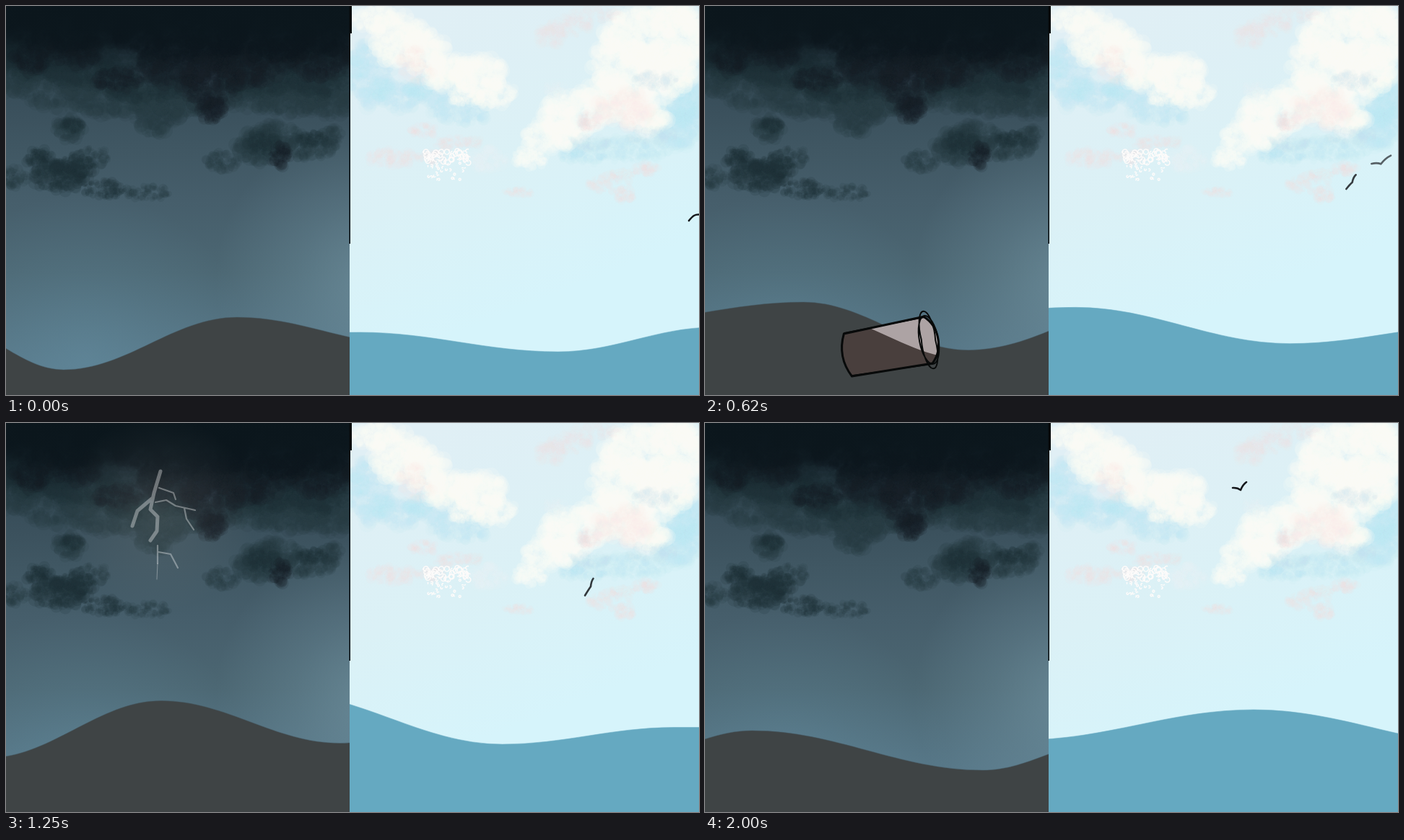
An HTML page with a canvas that plays this animation: 960 px wide and 540 px high, repeating every 2.12 s.

```html
<!DOCTYPE html>
<html lang="en">
<head>
<meta charset="utf-8">
<title>Storm and calm</title>
<style>
html, body { margin: 0; height: 100%; overflow: hidden; background: #0b161c; }
canvas { display: block; width: 100vw; height: 100vh; }
</style>
</head>
<body>
<canvas id="stage" width="960" height="540"></canvas>
<script>
const W = 960, H = 540, SPLIT = 476, LOOP = 2120;
const stage = document.getElementById('stage').getContext('2d');
const starts = Array.from({ length: 17 }, (_, k) => Math.floor(k * 12.5) * 10);

let seed = 7;
const random = () => (seed = (seed * 16807) % 2147483647) / 2147483647;

// Value of a track [[step, ...values], ...] at a step, or null outside its range
function at(track, step) {
  for (let i = 0; i < track.length; i++) {
    if (track[i][0] === step) return track[i].slice(1);
    const next = track[i + 1];
    if (next && track[i][0] < step && step < next[0]) {
      const u = (step - track[i][0]) / (next[0] - track[i][0]);
      return track[i].slice(1).map((v, j) => v + (next[j + 1] - v) * u);
    }
  }
  return null;
}

// ---------- painted sky ----------

function linear(c, x0, y0, x1, y1, stops) {
  const g = c.createLinearGradient(x0, y0, x1, y1);
  for (const [p, color] of stops) g.addColorStop(p, color);
  return g;
}

function glow(c, x, y, r, rgb, alpha) {
  const g = c.createRadialGradient(x, y, 0, x, y, r);
  g.addColorStop(0, `rgba(${rgb},${alpha})`);
  g.addColorStop(0.5, `rgba(${rgb},${alpha * 0.45})`);
  g.addColorStop(1, `rgba(${rgb},0)`);
  c.fillStyle = g;
  c.fillRect(x - r, y - r, 2 * r, 2 * r);
}

// Ragged brush cloud made of many small translucent dabs
function puff(c, color, alpha, [x, y, rx, ry]) {
  c.fillStyle = color;
  c.globalAlpha = alpha;
  for (let n = 40 + rx * ry / 8; n > 0; n--) {
    const a = random() * 2 * Math.PI, d = Math.sqrt(random());
    c.beginPath();
    c.arc(x + Math.cos(a) * d * rx, y + Math.sin(a) * d * ry, 1.5 + random() * Math.min(ry * 0.45, 11), 0, 7);
    c.fill();
  }
  c.globalAlpha = 1;
}
const puffs = (c, color, alpha, list) => list.forEach(p => puff(c, color, alpha, p));

function paintStorm(c) {
  c.fillStyle = linear(c, 0, 0, 0, 500, [[0, '#1b2a33'], [0.22, '#374c58'], [0.4, '#40576 3'.replace(' ', '')],
    [0.54, '#465e6b'], [0.74, '#4c6773'], [1, '#58798a']]);
  c.fillRect(0, 0, SPLIT, H);
  glow(c, 110, 490, 230, '104,148,168', 0.4);
  glow(c, 510, 380, 220, '120,155,170', 0.6);
  puffs(c, '#2a3c46', 0.15, [
    [10, 95, 35, 25], [70, 110, 55, 32], [140, 125, 55, 28], [205, 150, 30, 30], [245, 130, 45, 25],
    [335, 120, 50, 24], [395, 125, 50, 24], [445, 125, 36, 30], [88, 170, 20, 18],
    [300, 215, 23, 13], [350, 195, 33, 23], [375, 180, 35, 18], [420, 195, 36, 18], [452, 181, 15, 14],
    [12, 238, 22, 13], [115, 210, 27, 14], [195, 259, 34, 10]]);
  puffs(c, '#202f38', 0.16, [
    [48, 213, 20, 15], [75, 238, 38, 20], [95, 225, 30, 18], [135, 254, 30, 12], [92, 165, 14, 10],
    [355, 190, 22, 15], [425, 185, 20, 10], [25, 70, 38, 28], [100, 75, 60, 34],
    [190, 100, 65, 32], [350, 90, 60, 34], [430, 85, 50, 38]]);
  puffs(c, '#15222a', 0.13, [
    [35, 75, 26, 18], [95, 58, 42, 24], [155, 102, 32, 16], [285, 105, 42, 38], [285, 145, 18, 16],
    [240, 75, 60, 34], [340, 75, 50, 34], [430, 65, 50, 34], [380, 206, 15, 17]]);
  puffs(c, '#0c171d', 0.13, [[90, 30, 95, 28], [240, 40, 90, 32], [380, 38, 100, 36]]);
  c.fillStyle = linear(c, 0, 0, 0, 95, [[0, '#0b161c'], [0.35, 'rgba(11,22,28,.9)'], [1, 'rgba(11,22,28,0)']]);
  c.fillRect(0, 0, SPLIT, 95);
}

function paintCalm(c) {
  c.fillStyle = linear(c, 600, 0, 760, 400, [[0, '#e0eff5'], [0.55, '#dbf1f6'], [1, '#d6f4fb']]);
  c.fillRect(SPLIT, 0, W - SPLIT, H);
  puffs(c, '#bce4ef', 0.09, [
    [505, 95, 32, 45], [545, 125, 32, 20], [630, 145, 42, 18], [590, 115, 35, 20],
    [850, 200, 75, 16], [800, 208, 32, 12], [930, 165, 34, 30], [945, 130, 22, 24]]);
  puffs(c, '#fcfdfb', 0.16, [
    [510, 18, 32, 18], [545, 45, 38, 36], [580, 65, 32, 30], [615, 92, 38, 22], [655, 95, 36, 26],
    [675, 122, 32, 18], [640, 125, 26, 12], [900, 45, 75, 45], [855, 85, 45, 42], [915, 90, 38, 38],
    [925, 20, 32, 24], [845, 130, 55, 30], [785, 150, 42, 32], [755, 180, 38, 22], [725, 212, 24, 14],
    [885, 150, 35, 24]]);
  puffs(c, '#e9f5f7', 0.1, [[670, 213, 26, 16], [760, 115, 16, 10]]);
  puffs(c, '#cbe9f1', 0.07, [[900, 103, 30, 12], [895, 180, 35, 12], [810, 190, 28, 10]]);
  puffs(c, '#f8dde1', 0.1, [
    [535, 210, 34, 13], [578, 173, 20, 9], [618, 190, 30, 9], [590, 210, 20, 9],
    [710, 259, 21, 6], [835, 246, 30, 12], [858, 262, 14, 10], [887, 226, 18, 10], [808, 159, 14, 12]]);
  puffs(c, '#f9e6e7', 0.05, [[855, 142, 38, 26], [570, 92, 24, 14], [560, 70, 20, 14]]);
  puffs(c, '#f6e8e1', 0.08, [[755, 42, 22, 14], [780, 28, 32, 14], [815, 12, 38, 10], [648, 188, 16, 7], [855, 233, 18, 7]]);
  c.strokeStyle = '#fdfbfa';
  c.lineWidth = 1.5;
  for (let i = 0; i < 75; i++) {
    const low = i > 48, x = 610 + (random() - 0.5) * (low ? 55 : 62);
    const y = low ? 218 + random() * 24 : 201 + random() * 17;
    c.beginPath();
    c.arc(x, y, low ? 1.4 : 3.5, random() * 6, 4 + random() * 5);
    c.stroke();
  }
}

function makeSky() {
  const canvas = document.createElement('canvas');
  canvas.width = W;
  canvas.height = H;
  const c = canvas.getContext('2d');
  for (const [x, width, paint] of [[0, SPLIT, paintStorm], [SPLIT, W - SPLIT, paintCalm]]) {
    c.save();
    c.beginPath();
    c.rect(x, 0, width, H);
    c.clip();
    paint(c);
    c.restore();
  }
  return canvas;
}

// ---------- sea: each track is one crest or trough [step, x, y] ----------

const darkSea = [
  [[0, 320, 432], [1, 410, 437], [3, 480, 408], [6, 720, 400]],
  [[0, 80, 505], [1, 133, 508], [3, 215, 503], [6, 440, 465], [8, 700, 450]],
  [[0, -90, 440], [1, -40, 450], [3, -10, 447], [6, 210, 393], [8, 520, 402], [12, 800, 400]],
  [[3, -300, 440], [6, -60, 440], [8, 325, 449], [12, 600, 440], [16, 830, 440]],
  [[6, -300, 400], [8, 5, 378], [12, 425, 393], [16, 560, 440]],
  [[8, -235, 465], [12, 185, 465], [16, 385, 482]],
  [[8, -500, 370], [12, -110, 370], [16, 65, 427]],
  [[12, -400, 470], [16, -120, 470]],
  [[0, 560, 470], [1, 700, 460]]
];
const brightSea = [
  [[0, 980, 446], [1, 1040, 455]],
  [[0, 765, 480], [1, 890, 481], [3, 1160, 475]],
  [[0, 490, 453], [1, 590, 447], [3, 940, 448], [6, 1140, 440]],
  [[0, 300, 460], [1, 400, 458], [3, 670, 478], [6, 880, 464], [8, 1060, 460]],
  [[1, 200, 445], [3, 400, 445], [6, 570, 405], [8, 790, 405], [12, 1060, 440]],
  [[3, 100, 440], [6, 350, 435], [8, 470, 433], [12, 905, 459], [16, 1100, 450]],
  [[6, 100, 390], [8, 250, 380], [12, 505, 368], [16, 760, 398]],
  [[8, 0, 440], [12, 250, 440], [16, 440, 440]]
];

function seaPath(tracks, step) {
  const points = tracks.map(t => at(t, step)).filter(Boolean).sort((a, b) => a[0] - b[0]);
  const path = new Path2D();
  const [first, last] = [points[0], points[points.length - 1]];
  path.moveTo(-600, H);
  path.lineTo(-600, first[1]);
  path.lineTo(...first);
  for (let i = 1; i < points.length; i++) {
    const [px, py] = points[i - 1], [qx, qy] = points[i], d = (qx - px) * 0.364;
    path.bezierCurveTo(px + d, py, qx - d, qy, qx, qy);
  }
  path.lineTo(1600, last[1]);
  path.lineTo(1600, H);
  path.closePath();
  return path;
}

// ---------- floating things ----------

const bottle = {
  track: [[1, 77, 371, 23], [3, 279, 376, -9], [5, 490, 370, -30]],
  body: new Path2D('M-13 2Q0-4 13 2L12 15L14 40Q17 70 28 95Q45 130 46 170L48 260H-48L-45 165Q-43 125-27 98Q-17 75-14 40L-12 15Z'),
  detail: new Path2D('M-13 14Q-7 9 0 13T13 12M-13 2L13 3'),
  light: '#566549', dark: '#272b25', sink: 6
};
const can = {
  track: [[2, -60, 505, 30], [3, 62, 493, 22], [6, 347, 465, -27], [8, 490, 405, 150]],
  body: new Path2D('M58-33L-55-30Q-70 0-55 30L58 33Q72 20 72 0T58-33Z'),
  detail: new Path2D('M72 0A13 34 0 1 1 46 0A13 34 0 1 1 72 0M68 2A10 31 0 1 1 49-2A10 31 0 1 1 68 2'),
  light: '#ada3a4', dark: '#493f3d', sink: 13
};

function drawFloater(thing, sea, step) {
  const pose = at(thing.track, step);
  if (!pose) return;
  const place = new DOMMatrix().translate(pose[0], pose[1]).rotate(pose[2]);
  const body = new Path2D(), detail = new Path2D(), sunk = new Path2D();
  body.addPath(thing.body, place);
  detail.addPath(thing.detail, place);
  sunk.addPath(sea, new DOMMatrix().translate(0, thing.sink));
  stage.save();
  stage.clip(body);
  stage.fillStyle = thing.light;
  stage.fillRect(0, 0, SPLIT, H);
  stage.fillStyle = thing.dark;
  stage.fill(sunk);
  stage.restore();
  stage.strokeStyle = '#080a0a';
  stage.lineWidth = 3;
  stage.stroke(body);
  stage.lineWidth = 2;
  stage.stroke(detail);
  stage.save();
  stage.translate(pose[0], pose[1]);
  stage.rotate((pose[2] + 1.3) * Math.PI / 180);
  stage.lineWidth = 1.2;
  stage.stroke(thing.body);
  stage.restore();
}

// ---------- lightning ----------

const bolts = [
  {
    strength: { 1: 1, 2: 0.35 },
    lights: [[240, 60, 190, 0.3], [270, 250, 270, 0.3], [360, 470, 190, 0.38]],
    trunk: 'M187 45L208 97L238 122L237 136L266 139L270 152L264 165L268 184L238 205L243 222L239 238L248 256L273 248L258 294L280 285L270 305L287 312L282 325L290 342L323 325L328 360L336 373L347 370L290 447L295 458',
    twigs: 'M205 76L230 82L245 97L270 110L280 120L292 121M210 99L208 135L221 157L214 185M219 155L222 200M221 157L240 161M268 190L280 212L315 218L324 230M236 232L217 242L216 280L200 315M273 268L290 275L300 290L320 293L334 305M320 345L310 390L314 402M345 385L345 405L375 437M308 424L282 433L262 404M260 423L237 427',
    hairs: 'M217 245L216 300L223 348M222 265L245 280L255 303'
  },
  {
    strength: { 6: 1, 7: 0.35 },
    lights: [[160, 90, 125, 0.5], [110, 200, 110, 0.25], [35, 320, 110, 0.4]],
    trunk: 'M176 27L163 72L152 106L121 118L116 145L110 165L121 184L105 200L68 209L78 223L48 240L33 265L35 285',
    twigs: 'M161 70L140 77L118 98L80 108M92 108L66 146M154 122L170 138L186 167M122 145L138 155L142 190L165 200L172 212L194 227L196 238M55 213L30 208L13 230M97 202L103 219M111 227L122 238L134 262M37 283L28 300L24 345L12 370M37 283L52 298L56 332L66 345L67 368',
    hairs: 'M117 253V293M172 212L171 235M80 108L67 115'
  },
  {
    strength: { 8: 1, 9: 1, 10: 0.35 },
    lights: [[212, 125, 135, 0.55]],
    trunk: 'M214 67L205 97L200 120L210 130L209 150L200 163M202 105L182 122L175 143',
    twigs: 'M212 90L232 97L235 106M207 110L222 107L235 115L262 121M247 118L250 133L260 148M210 170L210 195M211 179L228 182L238 201',
    hairs: 'M210 195L209 217'
  }
];

function drawBolt(bolt) {
  stage.strokeStyle = '#fdfdfb';
  for (const [shape, width] of [[bolt.trunk, 5], [bolt.twigs, 2.2], [bolt.hairs, 1]]) {
    stage.lineWidth = width;
    stage.stroke(new Path2D(shape));
  }
}

// ---------- birds: [step, wing tip, body, wing tip, opacity] ----------

const birds = [
  [[0, 946, 298, 953, 291, 963, 290, 1], [1, 935, 291, 940, 281, 952, 282, 1],
   [3, 919, 276, 920, 266, 927, 271, 1], [6, 873, 243, 885, 234, 889, 216, 0.75],
   [8, 846, 241, 853, 227, 852, 211, 0.7], [12, 758, 238, 767, 227, 775, 221, 1],
   [16, 731, 90, 742, 93, 750, 82, 1]],
  [[1, 483, 260, 494, 274, 507, 266, 1], [3, 515, 233, 533, 222, 545, 236, 0.95], [4, 531, 205, 545, 215, 556, 206, 0.5]],
  [[3, 950, 259, 951, 246, 962, 247, 1], [6, 910, 199, 929, 206, 944, 188, 0.5], [7, 903, 182, 921, 190, 935, 176, 0.2]]
];

function drawBird(track, step) {
  const pose = at(track, step);
  if (!pose) return;
  const [ax, ay, bx, by, cx, cy, alpha] = pose;
  stage.globalAlpha = alpha;
  stage.strokeStyle = '#15171b';
  stage.lineWidth = 2.6;
  stage.beginPath();
  stage.moveTo(ax, ay);
  stage.quadraticCurveTo((ax + bx) / 2 + 1, (ay + by) / 2 - 2, bx, by);
  stage.quadraticCurveTo((bx + cx) / 2 - 1, (by + cy) / 2 - 2, cx, cy);
  stage.stroke();
  stage.globalAlpha = 1;
}

// ---------- scene ----------

const sky = makeSky();

function inPanel(x, width, draw) {
  stage.save();
  stage.beginPath();
  stage.rect(x, 0, width, H);
  stage.clip();
  draw();
  stage.restore();
}

function drawSea(path, fill, edge) {
  stage.fillStyle = fill;
  stage.fill(path);
  stage.strokeStyle = edge;
  stage.lineWidth = 1;
  stage.stroke(path);
}

function drawStorm(step) {
  const sea = seaPath(darkSea, step);
  const bolt = bolts.find(b => b.strength[step]);
  drawSea(sea, '#3f4445', 'rgba(70,90,100,.5)');
  if (bolt) {
    const strength = bolt.strength[step];
    for (const [x, y, r, a] of bolt.lights) glow(stage, x, y, r, '150,148,144', a * strength);
    stage.globalAlpha = strength;
    drawBolt(bolt);
    stage.globalAlpha = 1;
  }
  drawFloater(bottle, sea, step);
  drawFloater(can, sea, step);
}

function drawCalm(step) {
  drawSea(seaPath(brightSea, step), '#65a9c1', 'rgba(110,175,198,.6)');
  birds.forEach(b => drawBird(b, step));
}

function render(step) {
  stage.lineCap = stage.lineJoin = 'round';
  stage.drawImage(sky, 0, 0);
  inPanel(0, SPLIT, () => drawStorm(step));
  inPanel(SPLIT, W - SPLIT, () => drawCalm(step));
  stage.fillStyle = '#05090b';
  stage.fillRect(475.5, 0, 1.5, 330);
  stage.fillRect(476, 0, 3, 38);
}

const origin = performance.now();
function tick() {
  const t = (performance.now() - origin) % LOOP;
  render(starts.filter(s => s <= t).length - 1);
  requestAnimationFrame(tick);
}
tick();
</script>
</body>
</html>
```
